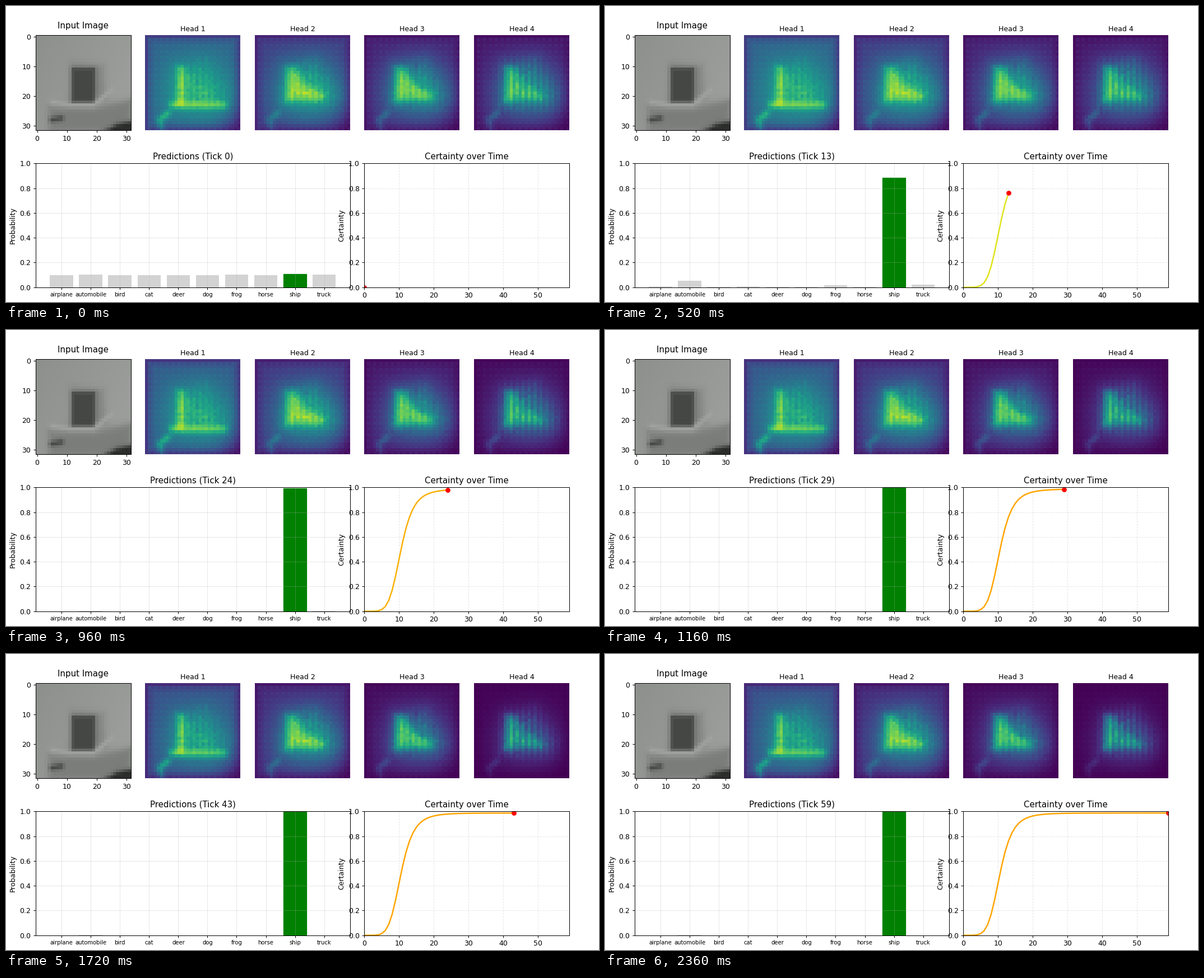
These frames come from a looping animation (1058 px wide and 529 px high, 2400 ms). A matplotlib script:

```python
import numpy as np
import matplotlib.pyplot as plt
from matplotlib.animation import FuncAnimation
from matplotlib.path import Path

W, H, DPI = 1058, 529, 90
TICKS = 60
N = 32

# How far each class falls behind the winning one
LAG = dict(airplane=4.7, automobile=2.9, bird=5.7, cat=4.7, deer=6.8,
           dog=5.7, frog=4.0, horse=6.5, ship=0, truck=3.8)
CLASSES = list(LAG)
LOGITS = -np.array(list(LAG.values()), float)
SHIP = CLASSES.index("ship")

COL, ROW = np.meshgrid(np.arange(N), np.arange(N))


# ---- soft drawing on the 32 x 32 grid ----
def distance(points):
    """Distance from every cell to a polyline."""
    best = np.full((N, N), np.inf)
    for (x0, y0), (x1, y1) in zip(points[:-1], points[1:]):
        dx, dy = x1 - x0, y1 - y0
        along = ((COL - x0) * dx + (ROW - y0) * dy) / (dx * dx + dy * dy)
        along = np.clip(along, 0, 1)
        best = np.minimum(best, np.hypot(COL - x0 - along * dx, ROW - y0 - along * dy))
    return best


def stroke(points, width):
    return np.exp(-(distance(points) / width) ** 2)


def shape(points, blur):
    closed = points + points[:1]
    cells = np.column_stack([COL.ravel(), ROW.ravel()])
    inside = Path(closed).contains_points(cells).reshape(N, N)
    return 1 / (1 + np.exp(np.where(inside, -1, 1) * distance(closed) / blur))


def blob(x, y, sx, sy):
    return np.exp(-((COL - x) / sx) ** 2 - ((ROW - y) / sy) ** 2)


# ---- attention heads: one ship, weighted differently by each head ----
HULL = [(10, 10), (20, 8.5), (26.5, 20), (25, 23.5), (8.5, 23)]
SAIL = [(10, 10.5), (13.5, 10.5), (16, 16), (23, 19.5), (22, 21.5), (9.5, 21.5)]
WASH = blob(18, 18.5, 13, 11)
GLOW = shape(HULL, 2.2)
CORE = shape(SAIL, 0.7)
MAST = stroke([(11.5, 11), (11.5, 22)], 1.5)
DECK = stroke([(9, 23), (26, 23)], 1.5)
HOOK = stroke([(7, 26), (4.5, 28), (5, 31)], 1.2)
BORDER = np.minimum(np.minimum(COL, N - 1 - COL), np.minimum(ROW, N - 1 - ROW))
CORNER = blob(N, N, 6, 6)
WEAVE = (COL % 2) * (ROW % 2) - 0.25
STRIPES = np.cos(np.pi * COL)


def head(seed, base, wash, glow, core, mast=0.0, deck=0.0, hook=0.15, stripes=0.03):
    field = base + wash * WASH + glow * GLOW + core * CORE
    field += mast * MAST + deck * DECK + hook * HOOK
    field *= (0.5 + 0.5 * np.tanh((BORDER + 0.2) / 1.8)) * (1 - 0.7 * CORNER)
    grain = np.random.default_rng(seed).normal(0, 0.025, (N, N))
    field += 0.03 * WEAVE * (1 - GLOW) + GLOW * (stripes * STRIPES + grain)
    return field.clip(0.01, 0.96)


HEADS = [
    head(1, base=0.33, wash=0.17, glow=0.14, core=0.04, mast=0.2, deck=0.24, hook=0.25),
    head(2, base=0.19, wash=0.26, glow=0.19, core=0.24, mast=0.06),
    head(3, base=0.1, wash=0.26, glow=0.2, core=0.26, mast=0.1),
    head(4, base=0.07, wash=0.24, glow=0.22, core=0.2, mast=0.13, stripes=0.06),
]
SHARPEN = [0.24, 0.24, 0.45, 0.8]


def scene():
    """Plain grey stand-in for the photograph."""
    grey = 143 + 0.35 * COL + 0.2 * ROW
    layers = [
        (0.6 * shape([(12, 9), (22, 10), (23, 21), (11, 22)], 0.8), 115),
        (shape([(4, 24), (19, 24), (32, 21), (32, 32), (4, 32)], 0.7), 124),
        (shape([(11.5, 10.5), (19.5, 10.5), (19.5, 22.5), (11.5, 22.5)], 0.3), 70),
        (0.9 * stroke([(5, 22), (11, 23), (19, 23), (25, 18)], 0.9), 162),
        (0.9 * stroke([(5, 28), (8, 27.5)], 1), 70),
        (shape([(22, 32), (27, 29.5), (32, 28.5), (32, 32)], 0.4), 38),
    ]
    for mask, tone in layers:
        grey = grey + (tone - grey) * mask
    return np.dstack([grey - 1, grey + 1, grey - 1]).clip(0, 255).astype(np.uint8)


# ---- certainty and the class probabilities that go with it ----
def certainty_at(tick):
    """Saturating rise, half way up at about ten and a half ticks."""
    rise = tick ** 5.75
    return 1e-4 + 0.987 * rise / (rise + 10.52 ** 5.75)


CERTAINTY = certainty_at(np.arange(TICKS, dtype=float))


def probabilities(certainty):
    """Sharpen the softmax until one minus its entropy meets the certainty."""
    low, high = 0.0, 6.0
    for _ in range(40):
        mid = (low + high) / 2
        p = np.exp(mid * LOGITS)
        p /= p.sum()
        reached = 1 + (p * np.log(p)).sum() / np.log(len(p))
        low, high = (mid, high) if reached < certainty else (low, mid)
    return p


# ---- layout ----
fig = plt.figure(figsize=(W / DPI, H / DPI), dpi=DPI, facecolor="white")

SIDE, STEP, LEFT = 170.0, 195.5, 52.9
TOP, LOWER, DEPTH = 52.2, 281.3, 221.4


def panel(column, y, span, h):
    """Axes covering a number of columns, with y and h in pixels."""
    x, w = LEFT + STEP * column, STEP * (span - 1) + SIDE
    return fig.add_axes([x / W, 1 - (y + h) / H, w / W, h / H])


ax_input = panel(0, TOP, 1, SIDE)
ax_input.imshow(scene())
ax_input.set_title("Input Image", pad=10)

head_images = []
for i, field in enumerate(HEADS, 1):
    ax = panel(i, TOP, 1, SIDE)
    head_images.append(ax.imshow(field, cmap="viridis", vmin=0, vmax=1))
    ax.set_title(f"Head {i}", fontsize=10)
    ax.axis("off")

ax_pred = panel(0, LOWER, 3, DEPTH)
bars = ax_pred.bar(CLASSES, [0.1] * len(CLASSES), color="lightgray")
bars[SHIP].set(facecolor="green", edgecolor="green", linewidth=1)
ax_pred.tick_params(axis="x", labelsize=8)
ax_pred.set(ylim=(0, 1), ylabel="Probability")
ax_pred.grid(alpha=0.3)
pred_title = ax_pred.set_title("Predictions (Tick 0)")

ax_cert = panel(3, LOWER, 2, DEPTH)
ax_cert.set(xlim=(0, TICKS - 1), ylim=(0, 1), xlabel="tick",
            ylabel="Certainty", title="Certainty over Time")
ax_cert.grid(alpha=0.3, linestyle="--")
curve, = ax_cert.plot([], [], lw=2)
marker, = ax_cert.plot([], [], "ro")

YELLOW = np.array([223, 227, 28]) / 255
ORANGE = np.array([255, 165, 0]) / 255


def smoothstep(start, end, value):
    u = np.clip((value - start) / (end - start), 0, 1)
    return u * u * (3 - 2 * u)


def update(tick):
    settle = smoothstep(8, 48, tick)
    for image, field, sharpen in zip(head_images, HEADS, SHARPEN):
        image.set_data(field ** (1 + sharpen * settle))
    for bar, p in zip(bars, probabilities(CERTAINTY[tick])):
        bar.set_height(p)
    pred_title.set_text(f"Predictions (Tick {tick})")
    curve.set_data(np.arange(tick + 1), CERTAINTY[:tick + 1])
    curve.set_color(YELLOW + (ORANGE - YELLOW) * smoothstep(13, 28, tick))
    marker.set_data([tick], [CERTAINTY[tick]])
    return [*head_images, *bars, pred_title, curve, marker]


animation = FuncAnimation(fig, update, frames=TICKS, interval=40,
                          repeat=True, repeat_delay=0, blit=False)
plt.show()
```
